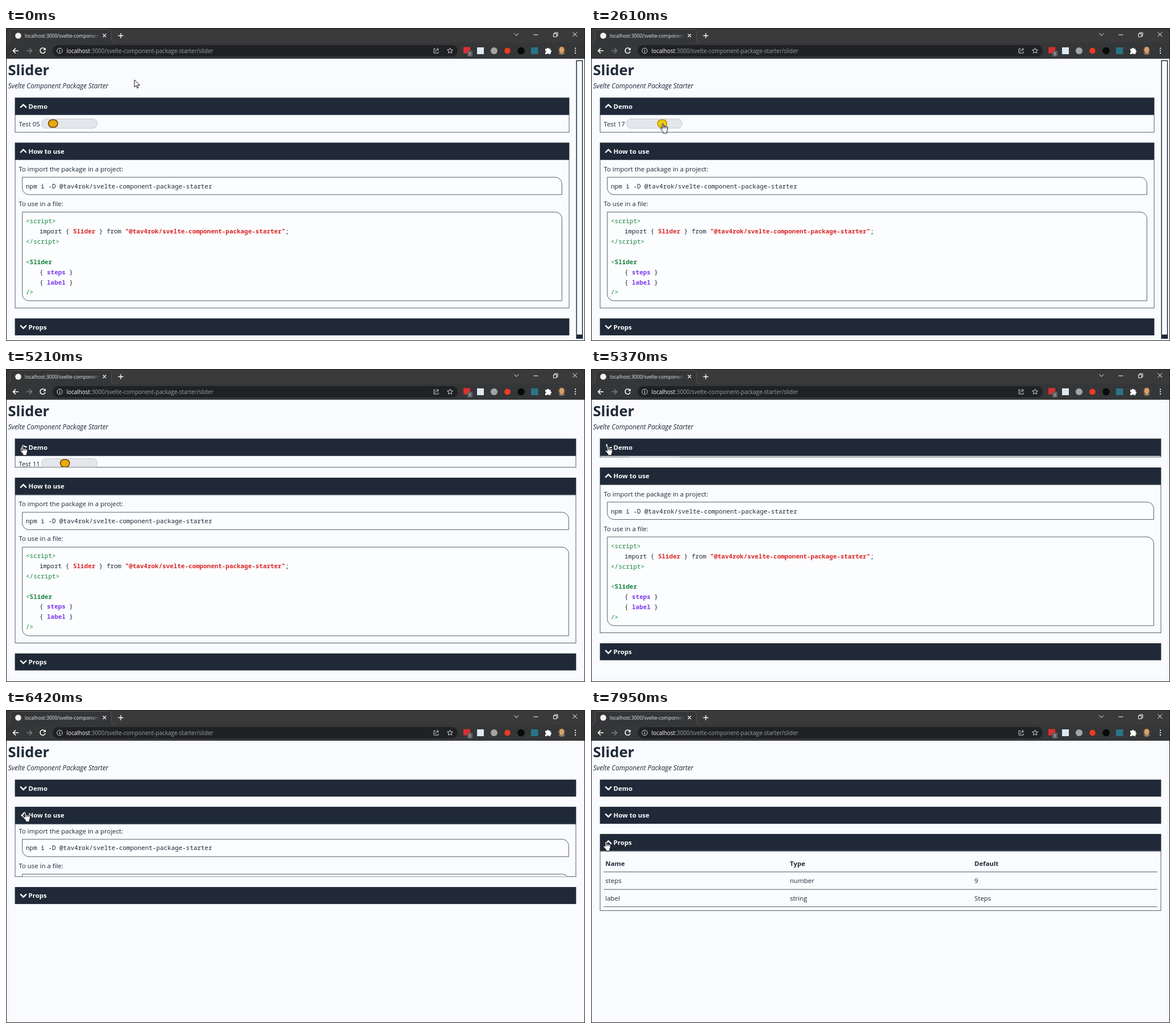
Animation of 1019x550 px, one loop 8000 ms. Source, as an HTML page:

```html
<!DOCTYPE html>
<html lang="en">
<head>
<meta charset="utf-8">
<title>Slider</title>
<style>
  html, body { margin: 0; width: 100%; height: 100%; overflow: hidden; }
  body { position: relative; background: #f9fbfe; }
  svg { position: absolute; left: 0; top: 0; overflow: visible; }
  svg text { font-family: "Open Sans", "Noto Sans", sans-serif; }
  .line { fill: none; stroke: #fff; }
  /* the page is laid out at full size and shown reduced */
  #page { position: absolute; left: 0; top: 0; width: 1366px; height: 737px; transform: scale(.746); transform-origin: 0 0; color: #1f2937; font: 15.3px/24px "Open Sans", "Noto Sans", sans-serif; }
  #list { position: absolute; left: 21px; top: 164px; width: 1308px; }
  section { margin-bottom: 24px; }
  h2 { position: relative; margin: 0; height: 40px; padding-left: 32px; background: #1f2937; color: #fff; font: inherit; font-weight: 700; line-height: 41.4px; }
  h2 svg { left: 8px; top: 8px; width: 24px; height: 24px; }
  h2 path { fill: none; stroke: #fff; stroke-width: 3.2; }
  .body { box-sizing: border-box; overflow: hidden; border: 1px solid #1f2937; padding: 8px; }
  p { position: relative; top: .7px; margin: 0; height: 24px; white-space: pre; }
  pre { margin: 8px; padding: 8px; border: 1px solid #1f2937; border-radius: 0 16px; background: #fbfdfe; font: 14.65px/24px "Noto Sans Mono", "DejaVu Sans Mono", monospace; }
  pre div { position: relative; top: -.5px; height: 24px; }
  .in { padding-left: 32px; }
  .tag { color: #15803d; }
  .str { color: #dc2626; }
  .prop { color: #7c3aed; }
  #track { position: absolute; left: 53px; top: -.7px; box-sizing: border-box; width: 133px; height: 24px; border: 2px solid #d3d5da; border-radius: 12px; background: #e5e6eb; }
  #thumb { position: absolute; top: 0; box-sizing: border-box; width: 24px; height: 20px; border: 2px solid #713f12; border-radius: 10px; background: #e7ab0b; }
  #thumb.on { background: #e9cd0c; border-color: #c1910b; }
  .row { display: flex; height: 40px; line-height: 41.4px; border-bottom: 1px solid #1f2937; }
  .row span { flex: 1; padding-left: 4px; }
  #bar { position: absolute; left: 1345px; top: 76px; width: 16px; height: 656px; background: #1f2937; }
  #bar div { position: absolute; left: 2px; right: 2px; top: 2px; height: 644px; background: #f9fbfe; }
  #cursor path { fill: #fff; stroke: #000; stroke-width: 1.2; stroke-linejoin: round; }
</style>
</head>
<body>
<div id="page">
  <div id="list">
    <section><h2>Demo</h2>
      <div class="body">
        <p><span id="label">Test 05</span><span id="track" class="hot"><span id="thumb"></span></span></p>
      </div>
    </section>
    <section><h2>How to use</h2>
      <div class="body">
        <p>To import the package in a project:</p>
        <pre><div>npm i -D @tav4rok/svelte-component-package-starter</div></pre>
        <p>To use in a file:</p>
        <pre><div class="tag">&lt;script&gt;</div><div class="in">import { <b class="str">Slider</b> } from <b class="str">"@tav4rok/svelte-component-package-starter"</b>;</div><div class="tag">&lt;/script&gt;</div><div></div><div class="tag">&lt;<b>Slider</b></div><div class="in">{ <b class="prop">steps</b> }</div><div class="in">{ <b class="prop">label</b> }</div><div class="tag">/&gt;</div></pre>
      </div>
    </section>
    <section><h2>Props</h2>
      <div class="body">
        <div class="row" style="font-weight:700"><span>Name</span><span>Type</span><span>Default</span></div>
        <div class="row"><span>steps</span><span>number</span><span>9</span></div>
        <div class="row"><span>label</span><span>string</span><span>Steps</span></div>
      </div>
    </section>
  </div>
  <div id="bar"><div></div></div>
</div>

<svg width="1019" height="550" viewBox="0 0 1019 550">
  <defs>
    <linearGradient id="fade" gradientUnits="userSpaceOnUse" x1="148" y1="0" x2="165" y2="0">
      <stop stop-color="#e8eaed"/><stop offset="1" stop-color="#e8eaed" stop-opacity="0"/>
    </linearGradient>
    <clipPath id="face"><circle cx="978" cy="39.5" r="7.5"/></clipPath>
  </defs>
  <text x="3.5" y="82.7" font-size="25.6" font-weight="700" fill="#1f2937">Slider</text>
  <text x="3.7" y="105.7" font-size="11.72" font-style="italic" fill="#1f2937">Svelte Component Package Starter</text>

  <!-- browser window -->
  <path d="M0 0H1019V54H0Z" fill="#3a3a3b"/>
  <path d="M0 26H1019V53.7H0Z" fill="#353637"/>
  <path d="M1 26Q7.5 26 7.5 20V8Q7.5 2.500 13 2.500H180Q185.500 2.500 185.500 8V20Q185.500 26 192 26" fill="#353637" stroke="#58595b" stroke-width=".8"/>
  <circle cx="21.5" cy="13.5" r="5.3" fill="#f4f4f4"/>
  <text x="33" y="16.5" font-size="8.5" fill="url(#fade)">localhost:3000/svelte-component-pa</text>
  <g class="line">
    <path d="M170.5 10.5l5.500 5.500m0-5.500l-5.500 5.500M197.500 13.500h9m-4.500-4.500v9" stroke-width="1.3"/>
    <path d="M894.5 9.500l3.800 3.800 3.800-3.800M928.500 12h8M963.500 10h5.500v5.500h-5.500zM965.500 10v-1.800h5.500v5.500h-2M997.500 7.500l7.500 7.500m0-7.500l-7.500 7.500"/>
    <path d="M22 40H12.500m4.500-4.500L12.500 40l4.500 4.500M68.500 37a4.600 4.600 0 1 0 .6 4" stroke-width="1.6"/>
    <path d="M36 40h9.500m-4.500-4.500l4.500 4.500-4.500 4.500" stroke="#7d7e80" stroke-width="1.5"/>
  </g>
  <path d="M69.8 34.5v4.600h-4.600z" fill="#fff"/>
  <rect x="82" y="30" width="713" height="20" rx="10" fill="#202124"/>
  <g fill="none" stroke="#d3d5d8">
    <circle cx="94.5" cy="40" r="4.700"/>
    <path d="M94.5 39v3.700M94.500 36.800v1.200" stroke-width="1.2"/>
    <path d="M756 36.5h-3v7.500h8v-2.500M755.500 42q.5-4.500 5-4.500m-2-2.500l3 2.500-3 2.700"/>
    <path d="M781.5 35l1.400 3.200 3.500.3-2.700 2.300.9 3.400-3.100-1.800-3.100 1.800.9-3.400-2.700-2.300 3.500-.3z"/>
  </g>
  <text x="106.5" y="43.500" font-size="9.93" fill="#9aa0a6"><tspan fill="#fff">localhost</tspan>:3000/svelte-component-package-starter/slider</text>

  <!-- toolbar extensions -->
  <rect x="805" y="33.5" width="12" height="11" fill="#d92f2f"/>
  <rect x="812" y="40" width="9" height="10" rx="2" fill="#606265"/>
  <text x="814.2" y="48.200" font-size="8" fill="#fff">1</text>
  <rect x="829" y="34" width="12" height="12" fill="#dce9f3"/>
  <circle cx="859" cy="40" r="6" fill="#a3a4a6"/>
  <circle cx="882.5" cy="40" r="5.300" fill="#ef3b22"/>
  <circle cx="906.5" cy="40" r="6.300" fill="#080b0a"/>
  <rect x="924" y="34" width="12.5" height="12" fill="#2a7488"/>
  <path d="M949 36.5h3a1.700 1.700 0 1 1 3.400 0h3v3a1.700 1.700 0 1 1 0 3.400v3h-3.200a1.500 1.500 0 0 0-3 0H949v-3.200a1.500 1.500 0 0 0 0-3z" fill="#fff"/>
  <g clip-path="url(#face)">
    <path d="M970 32h16v16h-16z" fill="#4b4037"/>
    <path d="M970 48q1-5 8-5t8 5z" fill="#8d8267"/>
    <ellipse cx="978" cy="38.5" rx="4.500" ry="5.500" fill="#d6a06a"/>
  </g>
  <path d="M1002 35.7h.01m0 4.100h-.01m0 4.100h.01" stroke="#fff" stroke-width="2.2" stroke-linecap="round"/>
  <path d="M.5.5H1018.500V549.500H.5Z" fill="none" stroke="#1c1c1d"/>

  <g id="cursor">
    <path id="arrow" d="M0 0V16.500L4 13 6.500 19 9 18 6.500 12.200H12Z" transform="scale(.78)"/>
    <g id="hand" transform="scale(.78) translate(-6)">
      <path d="M4.500 1.500a1.500 1.500 0 0 1 3 0V6.500a1.500 1.500 0 0 1 3 .5 1.500 1.500 0 0 1 3 .7 1.500 1.500 0 0 1 3 1V14L14.800 18V21.500H6.500V18.500L1 12.500C-.5 10.500 2 9 3.200 10.300L4.500 12Z"/>
      <path d="M7.500 6.500V10.500M10.500 7V10.500M13.500 8V11" style="fill:none"/>
    </g>
  </g>
</svg>

<script>
const LOOP = 8000, STEP = 80, FOLD = 400;
const PRESS = 1230, RELEASE = 3910;
const foldStarts = [5158, 6304, 7500];

// pointer moves: start, number of screen updates, where it ends
const moves = [
  [0, 1, 226, 91],
  [250, 8, 82, 167],
  [1480, 3, 75, 167],
  [1810, 11, 126.5, 168],
  [2690, 5, 140, 168],
  [3180, 8, 104.5, 168],
  [RELEASE, 4, 60, 204],
  [4230, 3, 21, 132],
  [4640, 3, 29.5, 135],
  [5050, 6, 29.5, 135],
  [5530, 5, 33, 178],
  [6180, 5, 34.5, 180],
  [6580, 4, 26.5, 201.5],
  [6900, 5, 26, 231],
  [7390, 8, 26, 231]];

const $ = id => document.getElementById(id);
const clamp = (v, lo, hi) => Math.min(hi, Math.max(lo, v));
const show = (el, on) => { el.style.display = on ? "" : "none"; };

const panels = [...document.querySelectorAll("section")].map((el, i) => {
  const head = el.querySelector("h2"), body = el.querySelector(".body");
  head.insertAdjacentHTML("beforeend", '<svg class="hot" viewBox="-12 -12 24 24"><path d="M-7.2 3.6L0-3.600 7.200 3.600"/></svg>');
  return { body, icon: head.querySelector("path"), full: body.offsetHeight, start: foldStarts[i], opens: i === 2 };
});
const hot = [...document.querySelectorAll(".hot")];

// the screen only refreshes in steps while something moves
function sample(t) {
  const i = moves.findLastIndex(m => m[0] <= t);
  const [start, n, x, y] = moves[i];
  const [, , x0, y0] = moves[Math.max(0, i - 1)];
  const step = Math.min(n - 1, Math.floor((t - start) / STEP));
  const k = (step + 1) / n;
  return { time: start + step * STEP, x: x0 + (x - x0) * k, y: y0 + (y - y0) * k };
}

// the CSS "ease" curve
function ease(p) {
  const bez = (s, a, b) => 3 * s * (1 - s) ** 2 * a + 3 * s * s * (1 - s) * b + s ** 3;
  let lo = 0, hi = 1;
  for (let i = 0; i < 18; i++) {
    const mid = (lo + hi) / 2;
    if (bez(mid, .25, .25) < p) lo = mid; else hi = mid;
  }
  return bez(lo, .1, 1);
}

function drawPanel({ body, icon, full, start, opens }, t) {
  const p = clamp((t - start) / FOLD, 0, 1);
  const left = (1 - p) ** 3;
  const open = opens ? 1 - left : left;
  const turn = opens ? 1 - ease(p) : ease(p);
  show(body, open > 0);
  body.style.height = full * open + "px";
  body.style.paddingBlock = 8 * open + "px";
  icon.setAttribute("transform", `rotate(${-180 * turn})`);
  return open;
}

function isHot(x, y) {
  return hot.some(el => {
    const r = el.getBoundingClientRect();
    return x > r.left && x < r.right && y > r.top && y < r.bottom;
  });
}

function draw(t) {
  const { time, x, y } = sample(t);
  const [demo] = panels.map(p => drawPanel(p, time));
  const scrolls = demo > .8;
  show($("bar"), scrolls);
  $("list").style.width = (scrolls ? 1308 : 1324) + "px";

  const drag = sample(clamp(t, PRESS, RELEASE - 1)).x;
  const value = Math.round(5 + (drag - 82.5) / 3.58);
  $("label").textContent = "Test " + String(value).padStart(2, "0");
  $("thumb").style.left = 13.6 + (value - 5) * 4.8 + "px";
  $("thumb").className = t >= PRESS && t < RELEASE ? "on" : "";

  const hand = isHot(x, y);
  $("cursor").setAttribute("transform", `translate(${x} ${y})`);
  show($("hand"), hand);
  show($("arrow"), !hand);
}

const begin = performance.now();
function tick() {
  draw((performance.now() - begin) % LOOP);
  requestAnimationFrame(tick);
}
tick();
</script>
</body>
</html>
```
